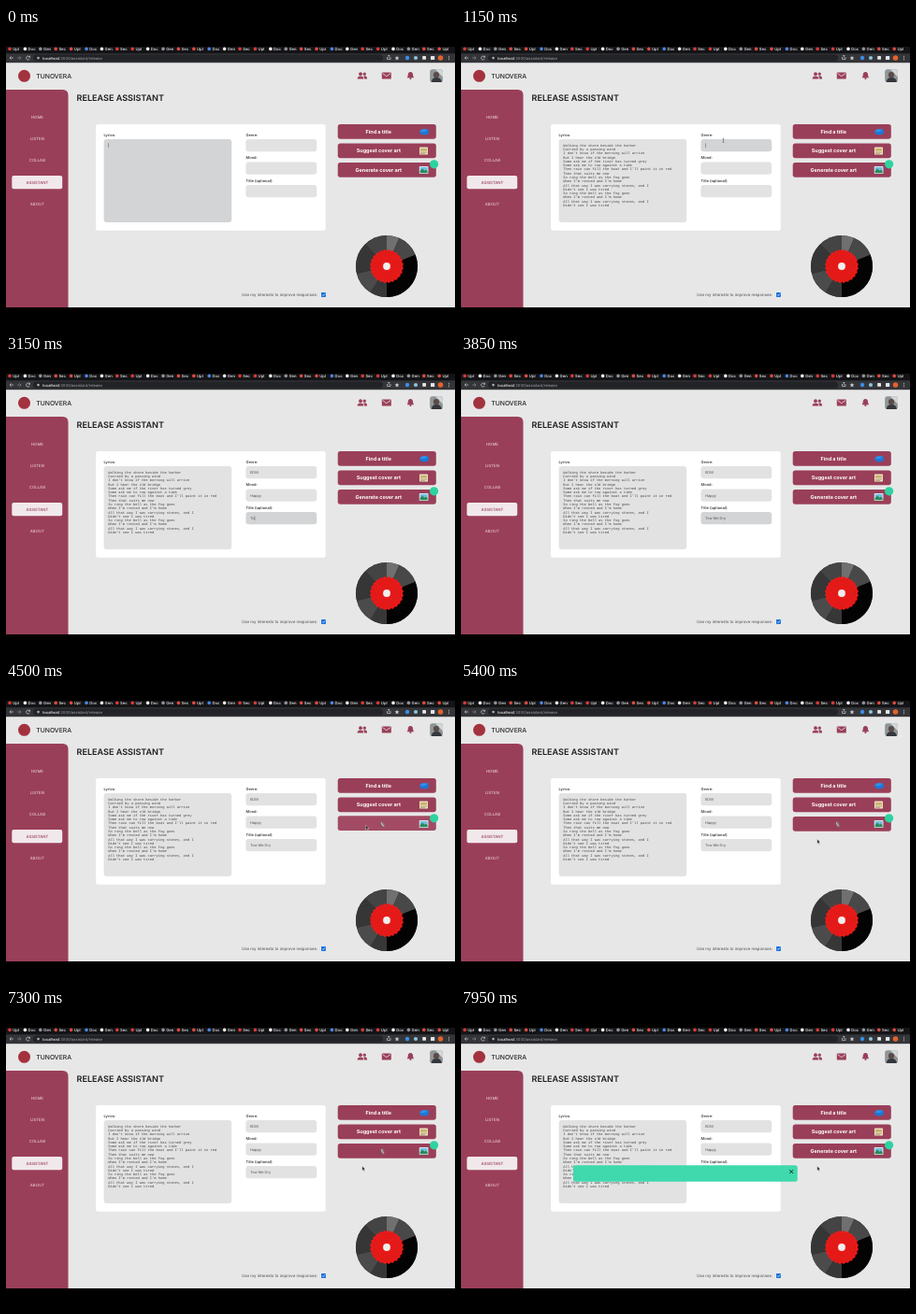
An HTML page that plays this animation: 480 px wide and 320 px high, repeating every 8000 ms.

```html
<!DOCTYPE html>
<html lang="en">
<head>
<meta charset="utf-8">
<title>Release assistant</title>
<style>
html, body { margin: 0; width: 100%; height: 100%; overflow: hidden; background: #000; }
svg { display: block; width: 100vw; height: 100vh; font-family: Inter, Roboto, sans-serif; }
text { text-rendering: geometricPrecision; }
.mono { font-family: "Liberation Mono", monospace; white-space: pre; }
</style>
</head>
<body>
<svg id="stage" viewBox="0 0 480 320"></svg>
<script>
const LOOP = 8000;
const MAROON = '#9a3f59', FIELD = '#e2e2e3', FOCUS = '#d3d4d6';
const stage = document.getElementById('stage');

const rect = (x, y, w, h, fill, r = 0, more = '') =>
  `<rect x="${x}" y="${y}" width="${w}" height="${h}" rx="${r}" fill="${fill}" ${more}/>`;
const circle = (x, y, r, fill) => `<circle cx="${x}" cy="${y}" r="${r}" fill="${fill}"/>`;
const path = (d, fill = 'none', more = '') => `<path d="${d}" fill="${fill}" ${more}/>`;
const label = (x, y, size, fill, str, more = '') =>
  `<text x="${x}" y="${y}" font-size="${size}" fill="${fill}" ${more}>${str}</text>`;
const mid = 'text-anchor="middle"';

const verse = [
  'Walking the shore beside the harbor',
  'Carried by a passing wind',
  "I don't know if the morning will arrive",
  'But I hear the old bridge',
  'Some ask me if the river has turned grey',
  'Some ask me to row against a tide',
  "Then rain can fill the boat and I'll paint it in red",
  'Then that suits me now'
];
const chorus = [
  'So ring the bell as the fog goes',
  "When I'm rested and I'm home",
  'All that way I was carrying stones, and I',
  "Didn't see I was tired"
];
const lyrics = [...verse, ...chorus, ...chorus];

// Typed fields: focus span, first key and key interval in ms
const fields = [
  { id: 'genre', name: 'Genre:', y: 119, text: 'EDM', from: 1050, to: 1780, start: 1350, step: 110 },
  { id: 'mood', name: 'Mood:', y: 143.5, text: 'Happy', from: 1780, to: 2650, start: 1870, step: 85 },
  { id: 'song', name: 'Title (optional):', y: 168, text: 'Tow Me Dry', from: 2650, to: 4300, start: 2980, step: 85 }
];

function browser() {
  const icons = ['#d93a36', '#e8e8e8', '#4a86e0', '#dd4b3e', '#8f9499', '#f0f0f0'];
  const words = ['Upl', 'Doc', 'Cal', 'Gen', 'Sec', 'Hor'];
  let out = rect(0, 20, 480, 8, '#141417') + rect(0, 27.3, 480, 9.9, '#343539');
  for (let i = 0; i < 29; i++) {
    const x = 4 + i * 16.4;
    out += circle(x, 22.4, 1.8, icons[(i * 5 + (i >> 2)) % 6]);
    out += label(x + 3.2, 24, 4.2, '#f1f2f3', words[(i * 7 + (i >> 1)) % 6], 'font-weight="500"');
  }
  out += rect(29, 28.6, 374, 7, '#222326', 3.5);
  const line = 'stroke="#c8cacd" stroke-width=".7"';
  out += path('M8 32H4m1.6-1.7L4 32l1.6 1.7', 'none', line);
  out += path('M12 32h4m-1.6-1.7L16 32l-1.6 1.7', 'none', line.replace('c8cacd', '85878b'));
  out += path('M25.4 31.2a2 2 0 1 0 0 1.7m.1-3.2v1.6h-1.6', 'none', line);
  out += circle(34.5, 32.1, 1.3, '#aeb0b4');
  out += label(39.3, 33.5, 4.1, '#a4a7ac',
    '<tspan fill="#fff" font-weight="500">localhost</tspan>:3000/assistant/release');
  out += path('M407.5 31v2.5h3.5V31m-1.7 1.2V29m-1 1l1-1 1 1', 'none', line);
  out += path('M418 29.8l.7 1.5 1.7.2-1.3 1.1.4 1.7-1.5-.9-1.5.9.4-1.7-1.3-1.1 1.7-.2z', '#c8cacd');
  out += circle(429, 32, 2.2, '#3a8ee6') + circle(438, 32, 2.1, '#8cc4dc');
  out += rect(445.2, 30, 3.8, 3.8, '#e4e5e7', .6);
  out += rect(454, 29.9, 4.2, 4.2, '#e4e5e7', .5) + circle(464.5, 32, 2.8, '#e2622b');
  for (const y of [30.2, 32, 33.8]) out += circle(473.5, y, .55, '#c8cacd');
  return out;
}

function header() {
  let out = circle(19.5, 51.3, 6.5, '#a3323f');
  out += label(32.3, 53.8, 6.8, '#25262a', 'TUNOVERA', 'font-weight="500"');
  out += circle(379, 49.2, 1.9, MAROON) + circle(383.3, 49.2, 1.6, MAROON);
  out += path('M375.6 54.5q0-3 3.4-3t3.4 3zM383.1 54.5q0-2-1-3 4-.8 4 3z', MAROON);
  out += rect(401.8, 47.4, 10, 7.2, MAROON, .9);
  out += path('M402.5 48.5l4.3 3.2 4.3-3.2', 'none', 'stroke="#f2e9ec" stroke-width=".8"');
  out += path('M428.6 53.3q1.1-1 1.1-3 0-2.9 2.7-3.3 2.7.4 2.7 3.3 0 2 1.1 3z', MAROON);
  out += circle(432.4, 54, 1.1, MAROON);
  out += rect(453.2, 44.3, 13.7, 13.7, '#8f9497', 2.5);
  out += path('M459 44.3h5q2.9 0 2.9 3.7v4.5z', '#d2d8da');
  out += path('M454.7 58q.5-5 5.5-5t5.7 5z', '#34373b') + circle(460, 50.2, 3.1, '#5a4c48');
  return out;
}

function sidebar() {
  let out = path('M0 66H60.5Q66.5 66 66.5 72V299H0z', MAROON);
  out += rect(6.3, 158, 53.9, 14.2, '#f1e8eb', 2);
  ['HOME', 'LISTEN', 'COLLAB', 'ASSISTANT', 'ABOUT'].forEach((s, i) => {
    out += label(33.4, 97.1 + i * 23.15, 4.3, i === 3 ? MAROON : '#e3c3cc', s, mid + ' font-weight="500"');
  });
  return out;
}

function form() {
  let out = rect(96, 103, 245.7, 113.8, '#fff', 2.5);
  const bold = 'font-weight="500"';
  out += label(104.6, 115.6, 4, '#222', 'Lyrics:', bold);
  out += rect(104.6, 119, 136.6, 89, FIELD, 3, 'id="area"');
  out += '<g id="lyrics" class="mono">' + lyrics.map((s, i) =>
    label(109.2, (126.7 + i * 4.29).toFixed(2), 3.72, '#444', s)).join('') + '</g>';
  for (const f of fields) {
    out += label(256.6, f.y - 3.3, 4, '#222', f.name, bold);
    out += rect(256.4, f.y, 75.8, 13.2, FIELD, 3, `id="${f.id}Box"`);
    out += label(261, f.y + 8.1, 3.9, '#555', '', `id="${f.id}" xml:space="preserve"`);
  }
  out += rect(0, 0, .4, 4.6, '#333', 0, 'id="caret"');
  out += label(252, 287.2, 4.35, '#4c4c4f', 'Use my interests to improve responses:');
  out += rect(337, 283.1, 4.9, 4.9, '#1670df', .8);
  out += path('M338.1 285.6l1 1 1.8-2.2', 'none', 'stroke="#fff" stroke-width=".7"');
  return out;
}

function buttons() {
  let out = '';
  ['Find a title', 'Suggest cover art', 'Generate cover art'].forEach((s, i) => {
    const y = 103 + i * 20.5;
    out += rect(354.7, y, 105.1, 15.7, MAROON, 2.7, `id="btn${i}"`);
    out += label(398.3, y + 9.8, 5.45, '#fff', s, `${mid} font-weight="700" id="cap${i}"`);
  });
  out += path('M442 111l3-2.8 6 .3 1 1.7-.6 3.2-4 1.2-4-.8z', '#1b78d6');
  out += path('M442 111l3-2.8 6 .3-3.4 2.7z', '#2f92ee');
  out += rect(442, 127.4, 9, 8.2, '#e9dfbf', .7) + rect(443, 129, 7, 2.6, '#c9b26a');
  out += rect(443, 132.7, 7, .8, '#a78f62') + rect(443, 134.2, 5, .6, '#a78f62');
  out += rect(441.8, 148, 9.6, 8, '#eef4f2', .7) + rect(442.6, 148.8, 8, 6.4, '#72bfe0');
  out += path('M442.6 155.2v-2l2.5-2.6 2.4 2.2 1.4-1.2 1.7 1.8v1.8z', '#2c8a56');
  out += '<g id="spin"><ellipse rx="1.7" ry="3.2" fill="#85747b"/>' +
    path('M-1-2.3Q-.9 0 .2 2.2', 'none', 'stroke="#d8cdd0" stroke-width=".9"') + '</g>';
  return out + circle(457.6, 145.8, 4.6, '#2cd3a0');
}

// Pie slices: start and end angle (clockwise from the top) with a grey
function vinyl() {
  const cx = 407, cy = 255, r = 33;
  const at = (deg, rad) => {
    const a = (deg - 90) * Math.PI / 180;
    return (cx + rad * Math.cos(a)).toFixed(2) + ' ' + (cy + rad * Math.sin(a)).toFixed(2);
  };
  const slices = [[0, 24, '#707070'], [24, 68, '#484848'], [68, 180, '#030303'],
    [180, 212, '#373737'], [212, 256, '#4b4b4b'], [256, 316, '#363636'], [316, 360, '#444']];
  let out = circle(cx, cy, r, '#222');
  for (const [a, b, fill] of slices)
    out += path(`M${cx} ${cy}L${at(a, r)}A${r} ${r} 0 0 1 ${at(b, r)}z`, fill);
  const edge = [];
  for (let i = 0; i < 48; i++) edge.push(at(i * 7.5, i % 2 ? 18.2 : 16.8));
  out += path('M' + edge.join('L') + 'z', '#ea1a18');
  for (const rad of [7, 9.5, 12, 14.5])
    out += `<circle cx="${cx}" cy="${cy}" r="${rad}" fill="none" stroke="#bd1a1a" stroke-width=".7" stroke-dasharray="1.2 .8"/>`;
  return out + circle(cx, cy, 3.9, '#f1eeee');
}

function overlay() {
  let out = '<g id="modal">' + rect(120, 167.3, 239.7, 17.4, '#3fd9ad', 2.5);
  out += path('M351.2 172l4 4m0-4l-4 4', 'none', 'stroke="#153d33" stroke-width="1"') + '</g>';
  out += path('M0 0V4.6L1.1 3.6 1.9 5.3 2.7 4.9 1.9 3.3H3.3z', '#111', 'id="arrow" stroke="#fff" stroke-width=".4"');
  out += path('M-.8-2H.8M0-2V2M-.8 2H.8', 'none', 'id="beam" stroke="#333" stroke-width=".45"');
  return out;
}

stage.innerHTML = rect(0, 0, 480, 320, '#000') + rect(0, 37, 480, 262, '#e7e7e7') +
  browser() + header() + sidebar() +
  label(75.6, 78.4, 9.05, '#1b1c1f', 'RELEASE ASSISTANT', 'font-weight="600"') +
  form() + buttons() + vinyl() + overlay();

const el = {};
stage.querySelectorAll('[id]').forEach(n => { el[n.id] = n; });
const show = (n, on) => n.setAttribute('visibility', on ? 'visible' : 'hidden');
const move = (n, x, y, more = '') => n.setAttribute('transform', `translate(${x} ${y})${more}`);
const ease = (t, a, b) => {
  const p = Math.min(1, Math.max(0, (t - a) / (b - a)));
  return p * p * (3 - 2 * p);
};
const mix = (a, b, p) => a + (b - a) * p;

function render(t) {
  const pasted = t >= 500;
  show(el.lyrics, pasted);
  el.area.setAttribute('fill', t < 1050 ? FOCUS : FIELD);

  let caretX = 109.2, caretY = 123.2;
  if (pasted) {
    caretX += lyrics[15].length * 2.232;
    caretY += 15 * 4.29;
  }
  for (const f of fields) {
    const n = Math.min(f.text.length, Math.max(0, Math.floor((t - f.start) / f.step)));
    const focused = t >= f.from && t < f.to;
    el[f.id].textContent = f.text.slice(0, n);
    el[f.id + 'Box'].setAttribute('fill', focused ? FOCUS : FIELD);
    if (focused) {
      caretX = 261.2 + (n ? el[f.id].getComputedTextLength() : 0);
      caretY = f.y + 4.3;
    }
  }
  move(el.caret, caretX, caretY);
  show(el.caret, t < 4300 && t % 1000 < 560);

  const toField = ease(t, 650, 1050);
  move(el.beam, mix(225, 280.5, toField), mix(160, 120.3, toField));
  show(el.beam, t >= 650 && t < 1350);

  const reach = ease(t, 3880, 4250), leave = ease(t, 4750, 5150);
  const y = mix(mix(122, 153.3, reach), 168.3, leave);
  move(el.arrow, mix(mix(300, 384.6, reach), 380.8, leave), y);
  show(el.arrow, t >= 3880);

  const loading = t >= 4300 && t < 7700;
  const hover = t >= 4150 && y < 160;
  el.btn2.setAttribute('fill', hover ? '#a34b65' : MAROON);
  move(el.btn2, 0, hover ? -.8 : 0);
  show(el.cap2, !loading);
  show(el.spin, loading);
  move(el.spin, 402.8, 152.3, ` rotate(${-25 + 12 * Math.sin(t / 160)})`);
  show(el.modal, t >= 7700);
}

const begin = performance.now();
function tick() {
  render((performance.now() - begin) % LOOP);
  requestAnimationFrame(tick);
}
tick();
</script>
</body>
</html>
```
